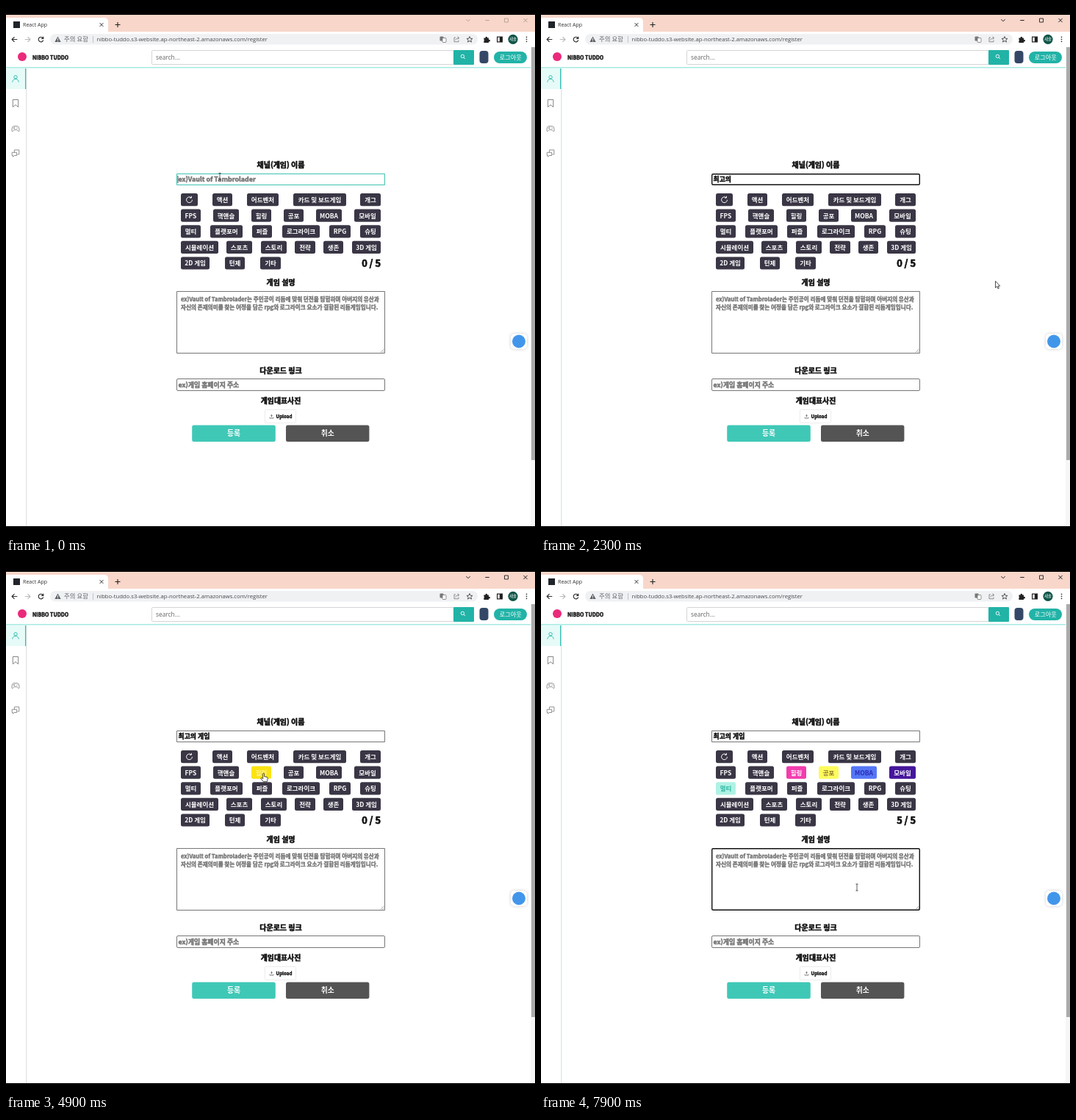
An HTML page with a canvas for the animation above (8000 ms loop, 720 px wide and 720 px high).

```html
<!DOCTYPE html>
<html lang="ko">
<head>
<meta charset="utf-8">
<title>React App</title>
<style>
html, body { margin: 0; width: 100%; height: 100%; overflow: hidden; background: #000; }
canvas { display: block; width: 720px; height: 720px; }
</style>
</head>
<body>
<canvas id="stage"></canvas>
<script>
const LOOP = 8000, STEP = 100;
const KR = '"Noto Sans CJK KR", "Noto Sans CJK", sans-serif';
const UI = '"Open Sans", "Noto Sans CJK KR", "Noto Sans CJK", sans-serif';
const TEAL = '#22b3a7', DARK = '#3a3645', GREY = '#757575';
const GAME = 'Vault of Tambrolader';

const cv = document.getElementById('stage');
const g = cv.getContext('2d');
const dpr = window.devicePixelRatio || 1;
cv.width = cv.height = 720 * dpr;
g.lineJoin = 'round';

// ---- helpers
function rect(x, y, w, h, fill) { g.fillStyle = fill; g.fillRect(x, y, w, h); }
function round(x, y, w, h, r, fill, stroke, lw = 1) {
  g.beginPath();
  g.roundRect(x, y, w, h, r);
  if (fill) { g.fillStyle = fill; g.fill(); }
  if (stroke) { g.strokeStyle = stroke; g.lineWidth = lw; g.stroke(); }
}
function disc(x, y, r, fill) { g.beginPath(); g.arc(x, y, r, 0, 7); g.fillStyle = fill; g.fill(); }
function path(d, stroke, lw = 1, fill) {
  const p = new Path2D(d);
  if (fill) { g.fillStyle = fill; g.fill(p); }
  if (stroke) { g.strokeStyle = stroke; g.lineWidth = lw; g.stroke(p); }
}
function icon(x, y, d, stroke, lw, fill) {
  g.save(); g.translate(x, y); path(d, stroke, lw, fill); g.restore();
}
// Weight 900 gets a thin outline, as the installed bold is lighter than black.
function text(s, x, y, size, color, { w = 900, font = KR, align = 'left' } = {}) {
  g.font = `${w} ${size}px ${font}`;
  g.textAlign = align;
  g.fillStyle = g.strokeStyle = color;
  const base = y + size * 0.37;
  g.fillText(s, x, base);
  if (w === 900) {
    g.lineWidth = size * 0.055;
    g.strokeText(s, x, base);
  }
  return g.measureText(s).width;
}
const ui = (s, x, y, size, color, align = 'left') => text(s, x, y, size, color, { w: 400, font: UI, align });
const mid = (s, x, y, size, color, w = 900) => text(s, x, y, size, color, { w, align: 'center' });

// ---- tags: label, left, right
const rows = [
  [['', 238, 261], ['액션', 281, 308], ['어드벤처', 328, 371], ['카드 및 보드게임', 391, 463], ['개그', 482, 510]],
  [['FPS', 238, 265], ['핵앤슬', 282, 317], ['힐링', 334, 361], ['공포', 378, 405], ['MOBA', 422, 457], ['모바일', 474, 510]],
  [['멀티', 238, 265], ['플랫포머', 278, 322], ['퍼즐', 335, 362], ['로그라이크', 376, 427], ['RPG', 440, 469], ['슈팅', 482, 510]],
  [['시뮬레이션', 238, 289], ['스포츠', 300, 335], ['스토리', 347, 382], ['전략', 393, 421], ['생존', 432, 459], ['3D 게임', 471, 510]],
  [['2D 게임', 238, 277], ['턴제', 298, 325], ['기타', 346, 374]]
];
const tags = rows.flatMap((row, i) => row.map(([name, l, r]) => ({ name, l, r, y: 255 + i * 21.6 })));
const TAG_H = 17.2;

// label: [click time, fill, text colour]
const picks = {
  '힐링': [5600, '#f23cae', '#fff'],
  '공포': [5900, '#fdfb5c', '#8f7330'],
  'MOBA': [6200, '#5577f6', '#2b2cb4'],
  '모바일': [6400, '#45169c', '#fff'],
  '멀티': [6900, '#aff2e4', '#2eb6a2']
};

// ---- timeline
const FOCUS = 500, MENU = 600, BLUR = 3700, AREA = 7700;
const moves = [
  [0, 291, 232], [700, 291, 232], [1300, 619.5, 375], [1900, 618.5, 374.5], [3500, 618.5, 374.5],
  [4100, 365, 264], [4500, 365, 264], [5000, 349, 289], [5600, 349, 289], [5800, 391, 288],
  [5900, 391, 288], [6100, 440, 287], [6200, 440, 287], [6400, 491, 288], [6700, 296, 310],
  [6850, 252, 309], [6950, 252, 309], [7200, 300, 364], [7600, 430, 441.5], [8000, 430, 441.5]
];
const typing = ['ㅊ', '초', '최', '최ㄱ', '최고', '최공', '최고의', '최고의 ', '최고의 ㄱ', '최고의 게', '최고의 겡', '최고의 게이', '최고의 게임'];
const TYPE_AT = 1700, KEY = 100;

function mouseAt(t) {
  let i = 0;
  while (i < moves.length - 2 && moves[i + 1][0] <= t) i++;
  const [t0, x0, y0] = moves[i], [t1, x1, y1] = moves[i + 1];
  const k = (t - t0) / (t1 - t0), e = k * k * (3 - 2 * k);
  return { x: x0 + (x1 - x0) * e, y: y0 + (y1 - y0) * e };
}
const inside = (m, l, t, r, b) => m.x >= l && m.x <= r && m.y >= t && m.y <= b;

// ---- browser frame
function drawBrowser(active) {
  rect(0, 0, 720, 720, '#000');
  rect(0, 12, 720, 696, '#fff');
  rect(0, 12, 720, 24, '#f8d7ca');
  round(-6, 16, 145, 24, 5, '#fff');
  rect(0, 35, 720, 21, '#fff');
  rect(10, 21, 9, 9, '#20232a');
  ui('React App', 23, 25.5, 7.1, '#333');
  icon(130, 25.5, 'M-2.4-2.4L2.4 2.4M2.4-2.4L-2.4 2.4', '#333', 1);
  icon(152, 25.5, 'M-3.5 0H3.5M0-3.5V3.5', '#222', 1.1);

  const c = active ? '#222' : '#b59d94';
  icon(629, 19.5, 'M-2.6-1.3L0 1.3L2.6-1.3', c, 1);
  icon(655, 19.5, 'M-2.7 0H2.7', c, 1);
  icon(681, 19.5, 'M-2.5-2.5H2.5V2.5H-2.5Z', c, 0.9);
  icon(707, 19.5, 'M-2.6-2.6L2.6 2.6M2.6-2.6L-2.6 2.6', c, 1);

  icon(11.5, 45.5, 'M3.8 0H-3.2M0-3.4L-3.4 0L0 3.4', '#333', 1.2);
  icon(29.5, 45.5, 'M-3.8 0H3.2M0-3.4L3.4 0L0 3.4', '#bbb', 1.2);
  icon(47.5, 45.5, 'M2.6-2A3.3 3.3 0 1 0 3.2 1M3.3-3.8V-1.1H.6', '#333', 1.2);
  round(60, 38, 582, 14.5, 7.2, '#f0f1f3');
  icon(70.5, 45.5, 'M0-4L4.2 3.6H-4.2Z', null, 1, '#5f6368');
  rect(70, 44, 1, 2.6, '#f0f1f3');
  rect(70, 47.4, 1, 1, '#f0f1f3');
  ui('주의 요함', 79, 45.3, 8.4, '#5f6368');
  rect(118, 41, 0.8, 9, '#b5b8bc');
  ui('nibbo-tuddo.s3-website.ap-northeast-2.amazonaws.com/register', 123.5, 45.3, 7.7, '#45494e');

  round(590.5, 41.5, 5, 6, 1, '#777');
  round(594, 43.5, 5, 6, 1, '#fff', '#777', 0.8);
  icon(613, 45.5, 'M-1-2.6H-3V3.2H3V1M-1 1C-.6-1 .6-2 3.4-2M1.6-4L3.8-2L1.6 0', '#777', 0.8);
  icon(631, 45.5, 'M0-4L1.1-1.3L4-1.1L1.8.8L2.5 3.6L0 2L-2.5 3.6L-1.8.8L-4-1.1L-1.1-1.3Z', '#444', 0.9);
  icon(654, 46, 'M-3.6-2.4H-1.3A1.3 1.3 0 1 1 1-2.4H3V0A1.3 1.3 0 1 1 3 2.2V4H-3.6V1.6A1.2 1.2 0 0 0-3.6-.4Z', null, 1, '#222');
  rect(668, 41.5, 8, 8, '#222');
  rect(669.2, 42.7, 2.6, 5.6, '#fff');
  disc(690, 45.3, 6.6, '#0d5547');
  ui('새솔', 690, 45.3, 5.4, '#fff', 'center');
  for (const y of [42.3, 45.3, 48.3]) disc(708.5, y, 0.85, '#333');
}

// ---- site header and side menu
function drawShell() {
  rect(27, 84, 1, 624, '#e2e4e4');
  rect(28, 84, 1, 624, '#f3f4f4');
  rect(0, 84, 27, 29, '#e6fbf8');
  rect(26, 84, 1.2, 29, '#2fc1b2');
  rect(0, 83, 714, 1, '#a4e9e1');
  rect(0, 84, 714, 1, '#d3f5f1');

  disc(22, 69, 6, '#ea2a7b');
  text('NIBBO TUDDO', 36, 70, 7, '#111');

  round(198.5, 60.5, 411, 19, 1, '#fff', '#d5d5d5');
  ui('search...', 204, 70.3, 8.4, '#666');
  round(609, 60, 28, 20, 1, TEAL);
  icon(622, 69, 'M1.2 1.2L3 3M1.6-.6A2.2 2.2 0 1 1-2.8-.6A2.2 2.2 0 1 1 1.6-.6', '#fff', 0.9);
  round(644.5, 61, 12, 17, 4, '#344766');
  round(664, 62, 45, 16, 8, TEAL);
  mid('로그아웃', 686.7, 70, 8.1, '#fff', 400);

  icon(13, 99, 'M2.2-2.2A2.2 2.2 0 1 1-2.2-2.2A2.2 2.2 0 1 1 2.2-2.2M-4.2 4.6C-4-1 4-1 4.2 4.6', '#35bfb2', 1);
  const c = '#858585';
  icon(13, 132.5, 'M-3.7-5H3.7V5L0 2L-3.7 5Z', c, 1);
  icon(13, 167, 'M-2.8-3.4H2.8C4.6-3.4 5.2 1 5 3C4.6 4.6 3 3 2 1.4H-2C-3 3-4.6 4.6-5 3C-5.2 1-4.6-3.4-2.8-3.4ZM-3.2-1H-.8M-2-2.2V.2M1.4-1H3', c, 0.9);
  icon(13, 200.5, 'M-1.6-4.6H4.8V1.4H2.4M-4.8-1.2H1.6V3H-2L-3.6 4.8V3H-4.8ZM-1.6-4.6V-1.2', c, 0.9);

  rect(714, 56, 6, 652, '#f6f6f6');
  rect(715, 56, 5, 562, '#ababab');

  g.save();
  g.shadowColor = 'rgba(0,0,0,.2)';
  g.shadowBlur = 4 * dpr;
  round(687, 446, 22, 21, 5, '#fff');
  g.restore();
  disc(698, 456.5, 9, '#4296ea');
}

// ---- form
function field(x, y, w, h, focus, tint) {
  if (focus) round(x + 0.2, y + 0.2, w - 0.4, h - 0.4, 1.5, '#fff', '#101010', 1.4);
  else round(x, y, w, h, 0, '#fff', tint || '#767676', 1);
}

function drawTags(t, m) {
  let count = 0, over = false;
  for (const tag of tags) {
    const w = tag.r - tag.l, hot = inside(m, tag.l, tag.y, tag.r, tag.y + TAG_H);
    const pick = picks[tag.name], on = pick && t >= pick[0];
    let fill = DARK, ink = '#fff';
    if (on) { count++; [, fill, ink] = pick; }
    if (hot) { over = true; fill = '#fae312'; ink = '#fff2a0'; }
    round(tag.l, tag.y, w, TAG_H, 2.5, fill);
    const cx = tag.l + w / 2, cy = tag.y + TAG_H / 2;
    if (tag.name) mid(tag.name, cx, cy + 0.3, 8.5, ink, 700);
    else icon(cx, cy, 'M2.4-2.9A3.9 3.9 0 1 0 3.9.2M2.9-4.8V-2.5H.5', '#fff', 1);
  }
  text(count + ' / 5', 510, 350, 12.8, '#111', { align: 'right' });
  return over;
}

function drawForm(t, m) {
  const focus = t >= FOCUS && t < BLUR, area = t >= AREA;
  const blink = t % 1060 > 530;
  mid('채널(게임) 이름', 374, 216.5, 10, '#111');
  const overName = inside(m, 232, 228, 516, 244);
  field(232.5, 228.5, 283, 15, focus, overName && !focus ? '#3fc1b1' : null);

  const k = Math.floor((t - TYPE_AT) / KEY);
  const typed = k < 0 ? '' : typing[Math.min(k, typing.length - 1)];
  const w = typed ? text(typed, 234.5, 236, 8.9, '#111') : 0;
  if (!typed) text('ex)' + GAME, 234.5, 236, 8.9, GREY);
  if (t < FOCUS || focus && blink) rect(233.6 + w, 231, 0.8, 10, '#222');

  const overTag = drawTags(t, m);

  mid('게임 설명', 374, 376.5, 10, '#111');
  field(232.5, 388.5, 283, 84, area);
  text(`ex)${GAME}는 주인공이 리듬에 맞춰 던전을 탐험하며 아버지의 유산과`, 238, 399.5, 7.6, GREY);
  text('자신의 존재의미를 찾는 여정을 담은 rpg와 로그라이크 요소가 결합된 리듬게임입니다.', 238, 410.5, 7.6, GREY);
  icon(515, 472, 'M-5-.6L-.6-5M-2.4-.6L-.6-2.4', '#777', 0.7);
  if (area && blink) rect(238, 395, 0.8, 9, '#222');

  mid('다운로드 링크', 374, 496, 10, '#111');
  round(232.5, 507.5, 283, 16, 1.5, '#fff', '#767676');
  text('ex)게임 홈페이지 주소', 234.5, 515.7, 8.9, GREY);

  mid('게임대표사진', 374, 537, 9.9, '#111');
  round(352.5, 549.5, 42, 18, 1, '#fff', '#ececec');
  icon(361.5, 558.7, 'M0 1V-2.3M-1.3-1L0-2.3L1.3-1M-2.4 1V2.4H2.4V1', '#333', 0.6);
  text('Upload', 367.5, 558.7, 6.2, '#111');

  round(253.2, 570.4, 113.6, 22.6, 2.5, '#40c8b7');
  mid('등록', 310, 581.7, 9.8, '#fff', 700);
  round(381, 570.4, 113.4, 22.6, 2.5, '#545454');
  mid('취소', 437.7, 581.7, 9.8, '#fff', 700);

  if (t >= MENU && t < TYPE_AT) drawMenu();
  if (overTag) return 'hand';
  return overName || inside(m, 232, 388, 516, 473) ? 'beam' : 'arrow';
}

function drawMenu() {
  g.save();
  g.shadowColor = 'rgba(0,0,0,.3)';
  g.shadowBlur = 4 * dpr;
  g.shadowOffsetY = dpr;
  rect(288, 252, 68, 125, '#fff');
  g.restore();
  ['제목', 'jejus', '2D게임입니다', 'sss', '2D게임', 'asdf']
    .forEach((s, i) => ui(s, 295, 262 + i * 20.5, 7.7, '#222'));
}

function drawCursor(kind, { x, y }) {
  if (kind === 'beam') {
    icon(x, y, 'M-1.6-4.5H1.6M0-4.5V4.5M-1.6 4.5H1.6', '#333', 0.8);
  } else if (kind === 'hand') {
    icon(x, y, 'M-1 .6C-1-.6 .9-.6 .9 .6V4.2L4.6 5C5.6 5.3 5.7 6 5.5 7L4.7 11.2H-.4L-3.6 7.4C-4.2 6.3-3 5.6-2.1 6.3L-1 7.3Z', '#222', 0.8, '#fff');
  } else {
    icon(x, y, 'M0 0V9L2.1 7.1L3.5 10.2L4.9 9.6L3.5 6.6H6.2Z', '#222', 0.8, '#fff');
  }
}

function draw(t) {
  g.setTransform(dpr, 0, 0, dpr, 0, 0);
  const m = mouseAt(t);
  drawBrowser(t >= FOCUS);
  drawShell();
  drawCursor(drawForm(t, m), m);
}

let start = null;
function tick(now) {
  if (start === null) start = now;
  draw(Math.floor(((now - start) % LOOP) / STEP) * STEP);
  requestAnimationFrame(tick);
}
draw(0);
requestAnimationFrame(tick);
</script>
</body>
</html>
```
